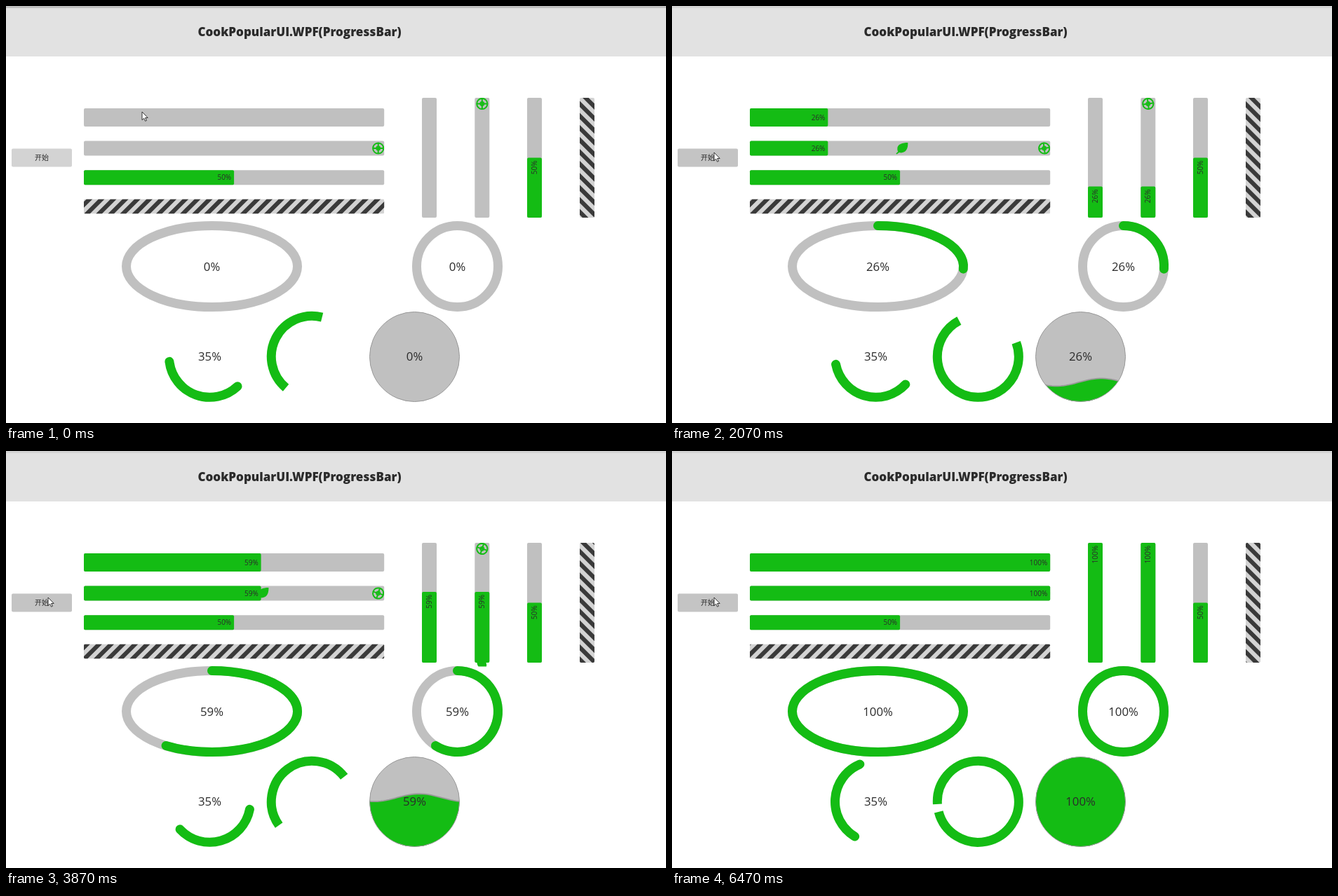
Write an HTML page that moves like this. It is 941 px wide and 595 px high and loops after 6540 ms.

```html
<!DOCTYPE html>
<html>
<head>
<meta charset="utf-8">
<style>
html, body { margin: 0; width: 100%; height: 100%; overflow: hidden; background: #fff; }
svg { display: block; }
text { font-family: "Open Sans", "Noto Sans", sans-serif; fill: #2b2b2b; text-anchor: middle; }
.big { font-size: 16.8px; }
.small { font-size: 10px; text-anchor: end; }
.title { font-size: 17px; font-weight: 800; }
.cjk { font-family: "Noto Sans CJK SC", "Noto Sans CJK", sans-serif; font-size: 10px; }
</style>
</head>
<body>
<svg id="stage" width="941" height="595" viewBox="0 0 941 595"></svg>
<script>
const GREEN = '#14bc14', GREY = '#c0c0c0', LIGHT = '#d3d3d3', DARK = '#3a3a3a';
const LOOP = 6540, STEP = 200 / 3;
const stage = document.getElementById('stage');

function add(parent, tag, attrs, text) {
  const e = document.createElementNS('http://www.w3.org/2000/svg', tag);
  set(e, attrs);
  if (text) e.textContent = text;
  parent.appendChild(e);
  return e;
}
function set(e, attrs) {
  for (const k in attrs) e.setAttribute(k, attrs[k]);
}
const mod = (a, n) => ((a % n) + n) % n;

// Linear interpolation through [time, value] points
function track(points, t) {
  if (t <= points[0][0]) return points[0][1];
  for (let i = 1; i < points.length; i++) {
    const [t0, v0] = points[i - 1], [t1, v1] = points[i];
    if (t <= t1) return v0 + (v1 - v0) * (t - t0) / (t1 - t0);
  }
  return points[points.length - 1][1];
}

const PROGRESS = [[770, 0], [1270, 10], [2070, 26], [3130, 46], [3870, 59], [4930, 83], [5780, 100]];
const CLOCK = [[0, 0], [70, .005], [1270, 1.194], [2070, 1.978], [3130, 3.072], [3870, 3.8], [4930, 4.872], [6540, 6.481]];

// Header and button
const topLine = add(stage, 'rect', { width: 941, height: 4 });
add(stage, 'rect', { y: 3, width: 941, height: 69, fill: '#e2e2e2' });
add(stage, 'text', { x: 418.5, y: 43, class: 'title' }, 'CookPopularUI.WPF(ProgressBar)');
const button = add(stage, 'rect', { x: 8, y: 203.5, width: 86, height: 26, rx: 2 });
add(stage, 'text', { x: 51, y: 219.5, class: 'cjk' }, '开始');

// Straight bars; vertical ones are the same bar turned by -90 degrees
let clipCount = 0;
function clipRect(g, attrs) {
  const id = 'clip' + clipCount++;
  add(add(g, 'clipPath', { id }), 'rect', attrs);
  return add(g, 'g', { 'clip-path': `url(#${id})` });
}
function place(x, y, vertical) {
  return add(stage, 'g', { transform: `translate(${x} ${y})` + (vertical ? ' rotate(-90)' : '') });
}

const LEAF = 'M8.5-8C1-8-7-6-6.5 1C-6.5 3-6 4-5.5 4.8L-8.5 7.5L-7.3 8.5L-4 6C4 8 9 2 8.5-8Z';

function bar(x, y, len, thick, vertical, icons) {
  const g = place(x, y, vertical);
  add(g, 'rect', { width: len, height: thick, rx: 2, fill: GREY });
  let wheel, leaf;
  const hub = len - 8.5, mid = thick / 2;
  if (icons) {
    const box = clipRect(g, { x: -5.5, y: 0, width: len + 5.5, height: thick });
    wheel = add(box, 'g', { fill: 'none', stroke: GREEN, 'stroke-width': 2 });
    add(wheel, 'circle', { r: 7.6 });
    add(wheel, 'path', { d: 'M-7 0H7M0-7V7' });
    add(wheel, 'circle', { r: 2.6, 'stroke-width': 1.6 });
    leaf = add(box, 'path', { d: LEAF, fill: GREEN });
  }
  const fill = add(g, 'rect', { height: thick, rx: 2, fill: GREEN });
  const label = add(g, 'text', { class: 'small' });

  return (p, s) => {
    const w = len * p / 100;
    fill.setAttribute('width', w);
    label.textContent = p ? p + '%' : '';
    const room = w - 8, need = p < 10 ? 14 : p < 100 ? 19.5 : 25.5;
    const k = Math.max(0, Math.min(1, room / need));
    set(label, { transform: `translate(${w - 4} ${mid + 3.6 * k}) scale(${k})` });
    if (!icons) return;
    wheel.setAttribute('transform', `translate(${hub} ${mid}) rotate(${s * 360})`);
    const run = mod(s - 1.03, 2) * 214;
    set(leaf, {
      transform: `translate(${hub - run} ${mid})`,
      visibility: s < 1.03 ? 'hidden' : 'visible'
    });
  };
}

function stripes(x, y, len, thick, vertical) {
  const g = place(x, y, vertical), pitch = 17.12;
  const box = clipRect(g, { width: len, height: thick, rx: 2 });
  add(box, 'rect', { width: len, height: thick, fill: LIGHT });
  let d = '';
  for (let a = -3 * pitch; a < len; a += pitch)
    d += `M${a} ${thick}l${thick} ${-thick}h${pitch / 2}l${-thick} ${thick}z`;
  const band = add(box, 'path', { d, fill: DARK });
  return s => band.setAttribute('transform', `translate(${mod(s, 1) * pitch} 0)`);
}

const LEN = 428.2, TALL = 171;
const bars = [
  bar(111, 146, LEN, 26, false, false),
  bar(111, 192.5, LEN, 21, false, true),
  bar(593, 302, TALL, 21, true, false),
  bar(668.3, 302, TALL, 21, true, true)
];
bar(111, 234.3, LEN, 21, false, false)(50, 0);
bar(743, 302, TALL, 21, true, false)(50, 0);
const bands = [
  stripes(111, 275.4, LEN, 21, false),
  stripes(818, 302, TALL, 21, true)
];

// Rings
function arcPath(cx, cy, rx, ry, from, sweep) {
  const at = deg => {
    const a = deg * Math.PI / 180;
    return `${cx + rx * Math.cos(a)} ${cy + ry * Math.sin(a)}`;
  };
  if (sweep <= 0) return '';
  const half = `A${rx} ${ry} 0 0 1 `;
  return `M${at(from)}${half}${at(from + sweep / 2)}${half}${at(from + sweep)}`;
}
function stroke(cap) {
  return add(stage, 'path', { fill: 'none', stroke: GREEN, 'stroke-width': 13, 'stroke-linecap': cap });
}
function bigText(x, y, text) {
  return add(stage, 'text', { x, y: y + 6, class: 'big' }, text);
}
function ring(cx, cy, rx, ry) {
  add(stage, 'ellipse', { cx, cy, rx, ry, fill: 'none', stroke: GREY, 'stroke-width': 13 });
  const arc = stroke('round'), label = bigText(cx, cy);
  return p => {
    arc.setAttribute('d', arcPath(cx, cy, rx, ry, -90, p * 3.6));
    label.textContent = p + '%';
  };
}
const rings = [ring(293.5, 371.5, 122, 58), ring(643.5, 371.5, 58, 58)];

const spinner = stroke('round');
bigText(290.5, 500, '35%');
const chaser = stroke('butt');

// Arc length: quick growth to a full turn, then a steady decline
function chaserSweep(s) {
  const grow = 1.09, period = 3.99, u = mod(s - 1.243, period);
  return 360 * (u < grow ? Math.pow(u / grow, .8) : (period - u) / (period - grow));
}

// Liquid gauge
const CX = 582.5, CY = 500.5, R = 64;
add(stage, 'circle', { cx: CX, cy: CY, r: R, fill: GREY });
add(add(stage, 'clipPath', { id: 'bowl' }), 'circle', { cx: CX, cy: CY, r: R });
const wave = add(add(stage, 'g', { 'clip-path': 'url(#bowl)' }), 'path',
  { fill: GREEN, stroke: '#999', 'stroke-width': 1.8 });
add(stage, 'circle', { cx: CX, cy: CY, r: R, fill: 'none', stroke: '#999', 'stroke-width': 1 });
const level = bigText(CX, 500);

function wavePath(p, s) {
  if (!p) return '';
  const base = p < 100 ? 570.2 - 1.28 * p : 420;
  const peak = 612 + 128 * (s - 1.978);
  let d = 'M510 580';
  for (let x = 510; x <= 656; x += 4)
    d += `L${x} ${(base - 5.5 * Math.cos((x - peak) * Math.PI / 64)).toFixed(2)}`;
  return d + 'V580Z';
}

const cursor = add(stage, 'path', {
  d: 'M0 0V11.6L2.7 9.2L4.5 13.2L6.4 12.4L4.6 8.5H8.2Z',
  fill: '#fff', stroke: '#222', 'stroke-width': .9, 'stroke-linejoin': 'round'
});

function draw(t) {
  const p = Math.floor(track(PROGRESS, t) + .001);
  const s = track(CLOCK, t);

  topLine.setAttribute('fill', t < 70 ? '#bfbfbf' : LIGHT);
  const shade = Math.round(track([[530, 211], [730, 196]], t));
  button.setAttribute('fill', `rgb(${shade},${shade},${shade})`);

  bars.forEach(f => f(p, s));
  bands.forEach(f => f(s));
  rings.forEach(f => f(p));
  spinner.setAttribute('d', arcPath(290.5, 500.3, 58, 58, 47 + 180 * s, 126));
  chaser.setAttribute('d', arcPath(436.3, 500.3, 58, 58, 130 + 288 * s, chaserSweep(s)));
  wave.setAttribute('d', wavePath(p, s));
  level.textContent = p + '%';

  const u = track([[0, 0], [630, 1]], t), e = u * u * (3 - 2 * u);
  cursor.setAttribute('transform', `translate(${194 - 134 * e} ${151 + 58 * e})`);
}

// The picture advances 15 times a second and pauses twice near the end
function frameTime(ms) {
  let k = Math.floor((mod(ms, LOOP) + 3.4) / STEP);
  if (k > 84 && k < 87) k = 84;
  if (k > 89 && k < 93) k = 89;
  return Math.round(k * STEP / 10) * 10;
}

const start = performance.now();
function tick() {
  draw(frameTime(performance.now() - start));
  requestAnimationFrame(tick);
}
draw(0);
requestAnimationFrame(tick);
</script>
</body>
</html>
```
